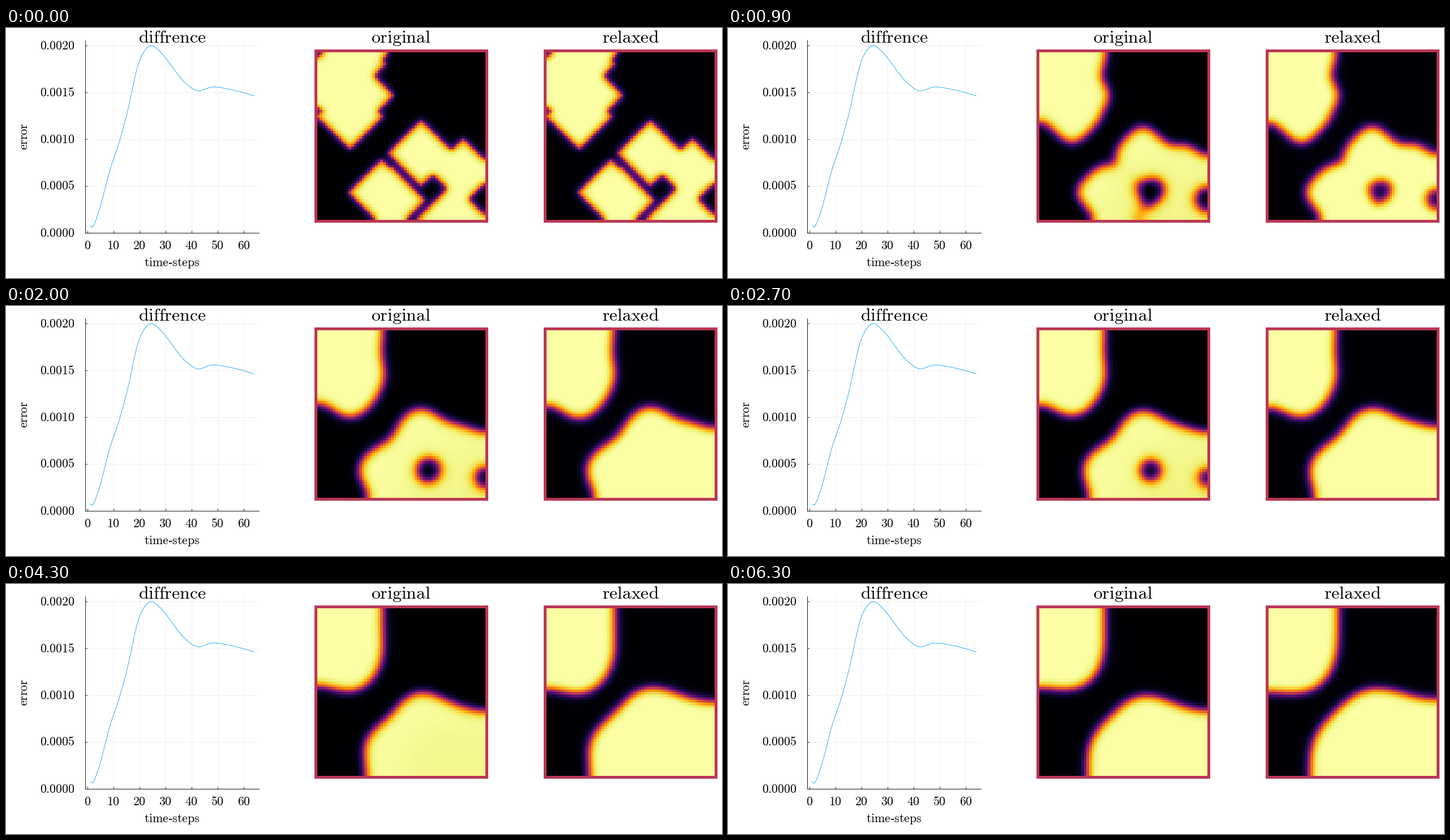
These frames come from a looping animation (1265 by 443 pixels, 6400 ms). A matplotlib script:

```python
import numpy as np
import matplotlib
import matplotlib.pyplot as plt
from matplotlib.animation import FuncAnimation

matplotlib.rcParams["mathtext.fontset"] = "cm"
matplotlib.rcParams["font.family"] = "Liberation Serif"

WIDTH, HEIGHT, DPI = 1265, 443, 64
PT = 72 / DPI                      # points per pixel
FRAMES, INTERVAL = 64, 100

# Cahn-Hilliard model, rescaled so that one grid cell has length 1.
CELLS = 64
SPACING, TIME_STEP, EPSILON = 3 / 512, 1e-3, 8e-3
TAU = TIME_STEP / SPACING**2
KAPPA = (EPSILON / SPACING)**2

# The initial bright phase is a union of diamonds: (column, row) of the centres.
RADIUS = 12
DIAMONDS = [(14, 0), (13, 4), (6, 8), (16, 16), (8, 16), (12, 24),
            (39, 38), (55, 45), (24, 53), (28, 56),
            (51, 62), (50, 63), (52, 63)]

# Cosine basis: no flux through the walls.
mode = np.arange(CELLS)
BASIS = np.sqrt(2 / CELLS) * np.cos(np.pi * np.outer(mode, mode + .5) / CELLS)
BASIS[0] /= np.sqrt(2)
eigenvalue = 4 * np.sin(np.pi * mode / (2 * CELLS))**2
K2 = eigenvalue[:, None] + eigenvalue


def initial_phase():
    row, col = np.mgrid[:CELLS, :CELLS]
    inside = [abs(col - x) + abs(row - y) <= RADIUS for x, y in DIAMONDS]
    return np.where(np.any(inside, axis=0), 1.0, -1.0)


def simulate(leak=0.0, bias=0.0):
    """Linear semi-implicit steps; a leak lets the total mass drift."""
    rate = TAU * (K2 + leak)
    phi, states = initial_phase(), []
    for _ in range(FRAMES):
        explicit = phi**3 - 3 * phi - bias
        spectrum = (BASIS @ phi @ BASIS.T
                    - rate * (BASIS @ explicit @ BASIS.T))
        spectrum /= 1 + rate * (2 + KAPPA * K2)
        phi = BASIS.T @ spectrum @ BASIS
        states.append(np.pad(phi, 1))      # ghost cells stay at zero
    return states


def hermite(x, xs, ys):
    """Smooth curve through a few unevenly spaced points."""
    xs, ys = np.asarray(xs, float), np.asarray(ys, float)
    slope = np.gradient(ys, xs)
    i = np.clip(np.searchsorted(xs, x, side="right") - 1, 0, len(xs) - 2)
    h = xs[i + 1] - xs[i]
    u = (x - xs[i]) / h
    return ((1 + 2*u) * (1 - u)**2 * ys[i] + u * (1 - u)**2 * h * slope[i]
            + u*u * (3 - 2*u) * ys[i + 1] + u*u * (u - 1) * h * slope[i + 1])


fig = plt.figure(figsize=(WIDTH / DPI, HEIGHT / DPI), dpi=DPI, facecolor="white")
ax = fig.add_axes([0, 0, 1, 1])
ax.axis("off")


def label(x, y, text, size, ha="center", **kw):
    ax.text(x, y, text, fontsize=size * PT, ha=ha, va="baseline", **kw)


def roman(text):
    return r"$\mathrm{%s}$" % text


def line(xs, ys, color="black", width=0.8, **kw):
    ax.plot(xs, ys, color=color, lw=width * PT, **kw)


def draw_chart():
    left, right, bottom, top = 139.5, 447, 362.5, 21.5
    x_zero, x_unit, y_unit = 143.7, 4.605, 166     # y in thousandths

    for step in range(0, 70, 10):
        x = x_zero + x_unit * step
        line([x, x], [bottom, top], width=.7, alpha=.09)
        line([x, x], [bottom, bottom - 3.5])
        label(x, 392.3, roman(step), 21.8)
    for value in np.arange(5) / 2:
        y = bottom - y_unit * value
        line([left, right], [y, y], width=.7, alpha=.09)
        line([left, left + 3.5], [y, y])
        label(121.5, y + 7, roman(f"{value / 1000:.4f}"), 21.8, ha="right")
    line([left, left, right], [top, bottom, bottom], width=.9)

    steps = np.arange(1, FRAMES + 1)
    error = hermite(steps,
                    [1, 2, 4, 9, 12, 15, 20, 22, 25, 27, 38, 41.5, 48, 55, 64],
                    [.07, .058, .19, .7, .943, 1.245, 1.837, 1.943, 1.997,
                     1.955, 1.587, 1.518, 1.554, 1.527, 1.461])
    line(x_zero + x_unit * steps, bottom - y_unit * error, color="#009AFA")

    label(293.5, 422.5, "$\\mathrm{time}$-$\\mathrm{steps}$", 21.8)
    label(38.5, 192, roman("error"), 21.8, rotation=90, rotation_mode="anchor")
    label(293.3, 25.7, roman("diffrence"), 31.8)


def draw_panel(left, title, top=38.4, side=306.6):
    label(left + side / 2, 25.7, roman(title), 31.8)
    return ax.imshow(np.zeros((CELLS + 2, CELLS + 2)), cmap="inferno",
                     vmin=-1, vmax=1, interpolation="nearest",
                     aspect="auto", origin="upper",
                     extent=(left, left + side, top + side, top))


draw_chart()
panels = [
    (draw_panel(545, "original"), simulate()),
    (draw_panel(950.2, "relaxed"), simulate(leak=.1, bias=.025)),
]
ax.set_xlim(0, WIDTH)
ax.set_ylim(HEIGHT, 0)


def update(frame):
    for image, states in panels:
        image.set_data(states[frame])
    return [image for image, _ in panels]


anim = FuncAnimation(fig, update, frames=FRAMES, interval=INTERVAL,
                     init_func=lambda: update(0), repeat=True, repeat_delay=0)
plt.show()
```
